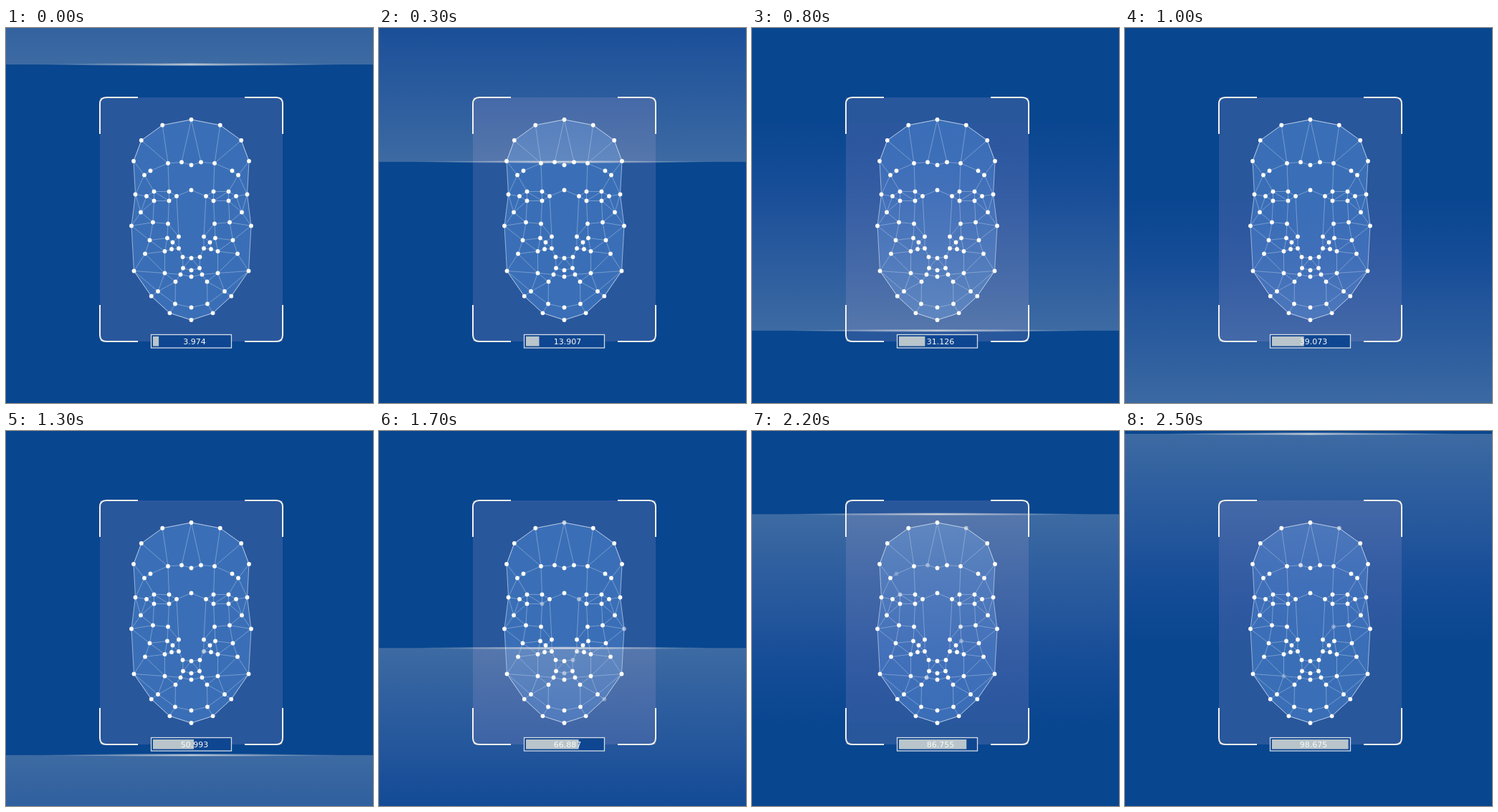
Recreate the animation shown at these times as an HTML page with a canvas. Size 512x524 px, loop 2.6 s.

```html
<!DOCTYPE html>
<html lang="en">
<head>
<meta charset="utf-8">
<title>Face scan</title>
<style>
html, body { margin: 0; width: 100%; height: 100%; overflow: hidden; background: #08468f; }
canvas { display: block; }
</style>
</head>
<body>
<canvas id="stage" width="512" height="524"></canvas>
<script>
const W = 512, H = 524, AXIS = 258.5, LOOP = 2600, STEP = 100;
const c = document.getElementById('stage').getContext('2d');
const times = (n, f) => Array.from({ length: n }, (_, i) => f(i));

// Points of half a face: distance from the axis, height. The other half mirrors it.
const crown = times(4, i => {
  const a = i * Math.PI / 6;
  return [80.5 * Math.sin(a), 186 - 58 * Math.cos(a)];
});
const jaw = times(4, i => {
  const u = (1 - i / 3) ** .89;
  return [80 * u, 408 - 68.5 * u * u];
});
const outline = [...crown, [78, 232.5], [83.5, 276.5], ...jaw];
const eye = times(6, i => {
  const a = i * Math.PI / 3;
  return [41.5 + 21 * Math.cos(a), 235 + 7.5 * Math.sin(a)];
});
const brow = [[65.5, 205.5], [57, 199.5], [32.5, 189], [13.5, 187.5], [0, 191.5]];
const cheek = [[70.5, 257.5], [53.5, 271.5], [32.5, 273.5], [58, 296.5], [33.5, 293.5], [64.5, 315.5], [37, 312]];
const nose = [[0, 226.5], [17.5, 291.5], [26, 299.5], [27.5, 309], [17.5, 308], [12, 320], [0, 321.5]];
const mouth = [[11.5, 335.5], [0, 338.5], [15, 344.5], [0, 347.5], [37, 342.5]];
const chin = [[22, 354.5], [46.5, 368], [22.5, 385.5], [0, 390.5]];
const half = [...outline, ...eye, ...brow, ...cheek, ...nose, ...mouth, ...chin];

// Join two points when no third lies in the circle between them (Gabriel graph).
const dist = (a, b) => Math.hypot(a[0] - b[0], a[1] - b[1]);
function joined(a, b) {
  if (a[0] + b[0] < 1) return false; // leave the middle line open
  const mid = [(a[0] + b[0]) / 2, (a[1] + b[1]) / 2], r = dist(a, b) / 2;
  return !half.some(p => p !== a && p !== b && dist(p, mid) < r);
}

const edges = [[eye[3], nose[1]]];
half.forEach((a, i) => half.slice(i + 1).forEach(b => joined(a, b) && edges.push([a, b])));

const hull = new Path2D(), web = new Path2D();
for (const s of [-1, 1]) {
  for (const [a, b] of edges) {
    web.moveTo(AXIS + s * a[0], a[1]);
    web.lineTo(AXIS + s * b[0], b[1]);
  }
  const side = s < 0 ? outline : [...outline].reverse();
  side.forEach(([d, y]) => hull.lineTo(AXIS + s * d, y));
}
hull.closePath();

// Some dots blink once, late in the loop.
let seed = 11;
const random = () => (seed = seed * 16807 % 2147483647) / 2147483647;
const dots = [];
for (const [d, y] of half) {
  for (const s of d < 1 ? [1] : [-1, 1]) {
    dots.push({ x: AXIS + s * d, y, blink: random() < .2 ? 1400 + 1100 * random() : 1e6 });
  }
}

const corners = new Path2D();
for (const sx of [-1, 1]) {
  for (const sy of [-1, 1]) {
    const x = 258.5 + 127.5 * sx, y = 267.5 + 170.5 * sy;
    corners.moveTo(x, y - 51 * sy);
    corners.lineTo(x, y - 9 * sy);
    corners.quadraticCurveTo(x, y, x - 9 * sx, y);
    corners.lineTo(x - 53 * sx, y);
  }
}

function beam(y, dir) {
  const end = y - dir * 290;
  const glow = c.createLinearGradient(0, y, 0, end);
  glow.addColorStop(0, 'rgba(205,205,215,.27)');
  glow.addColorStop(.5, 'rgba(130,140,200,.22)');
  glow.addColorStop(1, 'rgba(80,90,200,.03)');
  c.fillStyle = glow;
  c.fillRect(0, Math.min(y, end), W, 290);

  const shine = c.createLinearGradient(45, 0, 471, 0);
  shine.addColorStop(0, 'rgba(235,232,230,0)');
  shine.addColorStop(.5, 'rgba(235,232,230,.75)');
  shine.addColorStop(1, 'rgba(235,232,230,0)');
  c.fillStyle = shine;
  c.beginPath();
  c.ellipse(258, y, 213, 1.4, 0, 0, 7);
  c.fill();
}

function stroke(path, color, width) {
  c.strokeStyle = color;
  c.lineWidth = width;
  c.stroke(path);
}

function meter(pct) {
  c.fillStyle = '#0f4691';
  c.fillRect(203, 429, 111, 18);
  c.fillStyle = '#b9c5cb';
  c.fillRect(205, 431, 4 + 1.04 * pct, 13.5);
  c.strokeStyle = '#d5dce6';
  c.lineWidth = 1.3;
  c.strokeRect(202.5, 428.5, 112, 18.5);
  c.fillStyle = '#fbfaf5';
  c.font = '11px "DejaVu Sans", sans-serif';
  c.textAlign = 'center';
  c.fillText(pct.toFixed(3), 263, 442);
}

function draw(t) {
  const n = Math.floor(t / STEP);
  const tick = Math.max(6 * n - 1, Math.round(6 + 29 * n / 6)); // of 151
  const down = 9.07 * tick - 3.4, up = 933 - 6.235 * tick;

  c.fillStyle = '#08468f';
  c.fillRect(0, 0, W, H);
  c.fillStyle = '#29579c';
  c.fillRect(131, 97, 255, 341);
  c.fillStyle = '#3a6fb7';
  c.fill(hull);
  beam(Math.min(down, up), down < up ? 1 : -1);

  stroke(web, 'rgba(205,220,240,.4)', 1);
  stroke(hull, 'rgba(220,230,245,.6)', 1);
  stroke(corners, '#f5f1ec', 2);

  c.fillStyle = '#fffdf6';
  for (const { x, y, blink } of dots) {
    c.globalAlpha = Math.min(1, .2 + Math.abs(n * STEP - blink) / 400);
    c.beginPath();
    c.arc(x, y, 2.9, 0, 7);
    c.fill();
  }
  c.globalAlpha = 1;
  meter(tick * 100 / 151);
}

const start = performance.now();
function frame() {
  draw((performance.now() - start) % LOOP);
  requestAnimationFrame(frame);
}
frame();
</script>
</body>
</html>
```
